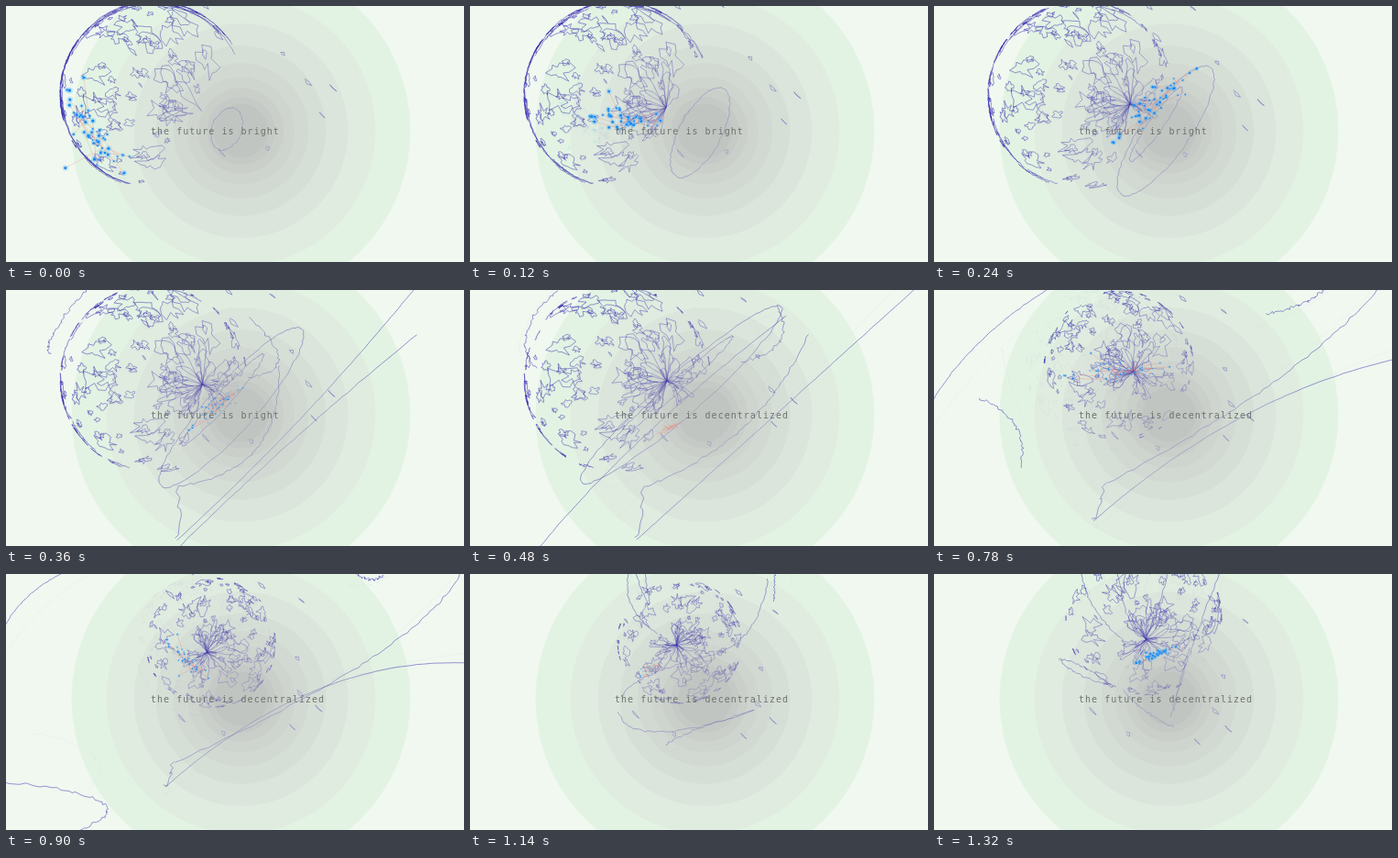
Write an HTML page with a canvas that moves like this. It is 500x279 px and loops after 1.38 s.

```html
<!DOCTYPE html>
<html lang="en">
<meta charset="utf-8">
<style>
  html, body { margin: 0; width: 100%; height: 100%; overflow: hidden; background: #f0f8f0; }
  canvas { position: absolute; left: 0; top: 0; }
  p { position: absolute; left: 158px; top: 131px; margin: 0; white-space: pre;
      font: 10px/11px "DejaVu Sans Mono", monospace; letter-spacing: 1.02px; color: #6d736d; }
</style>
<canvas id="stage" width="500" height="279"></canvas>
<p id="bright">the future is bright</p>
<p id="decentral">the future is decentralized</p>
<script>
const LOOP = 1380, STEP = 60, TAU = Math.PI * 2;
const ctx = stage.getContext('2d');

const rnd = n => { const s = Math.sin(n * 127.1 + 3.7) * 43758.5453; return s - Math.floor(s); };
const lerp = (a, b, f) => a + (b - a) * f;
const ease = x => { x = Math.max(0, Math.min(1, x)); return x * x * (3 - 2 * x); };
const range = n => [...Array(n).keys()];

// Value of a row of key poses at a time; the first and last motions run on.
function pose(times, keys, t) {
  let k = 0;
  while (k < times.length - 2 && t >= times[k + 1]) k++;
  const f = (t - times[k]) / (times[k + 1] - times[k]);
  return keys[k].map((v, i) => lerp(v, keys[k + 1][i], f));
}

function polyline(points, jag = 0, seed = 0) {
  ctx.beginPath();
  points.forEach(([x, y], i) => ctx.lineTo(
    x + jag * (rnd(i + seed) * 2 - 1), y + jag * (rnd(i + seed + 500) * 2 - 1)));
  ctx.stroke();
}

const bezier = ([ax, ay, bx, by, cx, cy], n = 60) => range(n + 1).map(i => {
  const u = i / n, v = 1 - u;
  return [v * v * ax + 2 * u * v * bx + u * u * cx, v * v * ay + 2 * u * v * by + u * u * cy];
});

function globeAt(t) {
  const shrink = ease((t - 520) / 460), rise = ease((t - 1140) / 180);
  return {
    cx: 161 + 68 * shrink, cy: 97 - 24 * shrink - 26 * rise, r: 102 - 34 * shrink + 17 * rise,
    px: 214 + 20 * (t / LOOP) ** 3, py: 115 - .033 * t
  };
}

// Land lies in polar coordinates around a tilted axis; the first pieces meet at the pole.
function drawLand({ cx, cy, r, px, py }, t) {
  const ax = (px - cx) / r, ay = (py - cy) / r, flat = Math.hypot(ax, ay) || 1e-6;
  const az = Math.sqrt(Math.max(0, 1 - flat * flat)), limit = Math.min(45 + .15 * t, 90);
  const project = (theta, phi) => {
    const s = Math.sin(theta), c = Math.cos(theta), u = s * Math.cos(phi), v = s * Math.sin(phi);
    return [cx + r * (c * ax + u * ay / flat + v * az * ax / flat),
            cy + r * (c * ay - u * ax / flat + v * az * ay / flat),
            c * az - v * flat];
  };
  for (let i = 0; i < 230; i++) {
    const ray = i < 20, size = .025 + .11 * rnd(i + 600) ** 2;
    const theta = ray ? .07 + .2 * rnd(i) : Math.acos(1 - 1.9 * rnd(i));
    const phi = TAU * rnd(i + 300) + t * .0007;
    const [x, y, z] = project(theta, phi);
    if (z < 0 || x - cx + (y - cy) * .6 > limit) continue;
    polyline(range(16).map(j => {
      const a = j % 15 / 15 * TAU, s = size * (.25 + 1.1 * rnd(i * 15 + j % 15));
      return project(Math.max(0, theta + Math.cos(a) * (ray ? theta : s * 1.5)),
                     phi + Math.sin(a) * s / Math.max(.3, Math.sin(theta)));
    }));
  }
}

// Overlapping broken arcs that thin out while the globe turns away.
function drawLimb({ cx, cy, r }, t) {
  for (let i = 0; i < 34 * (1 - t / 760); i++) {
    const start = 1.8 + 3.4 * rnd(i + 20), span = (.1 + .9 * rnd(i + 50)) * Math.max(.15, 1 - t / 500);
    const radius = r * (1 - .035 * rnd(i + 80) ** 2);
    polyline(range(25).map(j => {
      const a = start + span * j / 24;
      return [cx + radius * Math.cos(a), cy + radius * Math.sin(a)];
    }), .6, i * 30);
  }
}

// A thin continent that stretches out across the view.
function drawContinent(t) {
  const u = t / 480, cx = 241 - 10 * u + 68 * u * (1 - u), cy = 134 - 20 * u + 48 * u * (1 - u);
  const angle = -1.2 + .48 * u, long = 24 + 121 * u, wide = 16 + 6 * u + 28 * u * (1 - u);
  const c = Math.cos(angle), s = Math.sin(angle);
  for (const inner of u < .4 ? [1] : [1, .3]) {
    polyline(range(81).map(i => {
      const a = i / 80 * TAU, x = Math.cos(a) * long * (.4 + .6 * inner);
      const y = Math.sin(a) * wide * inner - wide * (1 - inner) * .7;
      return [cx + x * c - y * s, cy + x * s + y * c];
    }), .8, 40);
  }
}

// Key curves: start, control, end.
const sweepTimes = [480, 660, 900];
const edge = [[182,272, 336,134, 490,-5], [175,271, 325,140, 505,53], [174,232, 335,90, 505,97]];
const shelf = [[192,214, 320,165, 369,48], [195,215, 345,116, 476,-3], [185,205, 460,80, 497,-3]];
const streak = [[77,279, 175,160, 345,28], [-5,188, 60,85, 190,-3], [-5,66, 10,25, 65,-3]];
const cape = [[297,78, 360,65, 335,17], [345,53, 405,30, 440,-2], [382,-2, 395,12, 412,2]];
const coast = [[95,0, 40,50, 72,85], [100,8, 45,40, 108,108], [-3,226, 170,245, 80,279]];

const lateTimes = [1140, 1320];
const late = [
  [[162,150, 175,195, 310,149], [137,92, 150,112, 193,121]],
  [[310,149, 230,172, 213,187], [193,121, 165,98, 137,92]],
  [[165,135, 175,110, 265,88], [207,127, 225,150, 262,167]],
  [[265,88, 315,75, 325,5], [258,155, 280,80, 312,-3]],
  [[333,-3, 332,15, 332,30], [262,150, 268,110, 280,80]],
  [[173,-3, 165,40, 205,65], [160,-3, 170,45, 207,72]],
  [[180,-3, 205,70, 190,-3], [200,-3, 225,140, 255,-3]]];

function drawCoasts(t) {
  if (t >= 1020) {
    late.forEach((keys, i) => polyline(bezier(pose(lateTimes, keys, t), 36), 1, i * 70));
  } else if (t >= 360) {
    const near = pose(sweepTimes, edge, t), far = pose(sweepTimes, shelf, t);
    polyline(bezier(near), .2);
    polyline(bezier([...far.slice(0, 2), lerp(near[0], far[0], .3), lerp(near[1], far[1], .6), ...near.slice(0, 2)], 8), 4, 7);
    polyline(bezier(far), 1);
    polyline(bezier(pose(sweepTimes, streak, t)), .4);
    [cape, coast].forEach((keys, i) => polyline(bezier(pose(sweepTimes, keys, t), 40), 1.6, i * 90));
  }
}

function drawIslets(t) {
  for (let i = 0; i < 12; i++) {
    const a = TAU * rnd(i + 11) + t * .0006, d = 70 + 70 * rnd(i + 31);
    const x = 220 + d * Math.cos(a), y = 95 + d * .8 * Math.sin(a), l = 2 + 3 * rnd(i);
    polyline([[x - l, y - l], [x + 1, y - 1], [x + l, y + l], [x - 1, y + 1], [x - l, y - l]], 1, i * 9);
  }
}

// centre, direction, scatter, dot size
const swarmTimes = [0, 240, 480, 660, 900, 1140, 1320];
const swarm = [[97,142, 30,60, 20,2.3], [242,107, 55,-55, 12,2], [217,151, 16,-8, 4,0], [205,84, 115,-42, 16,1.3],
  [198,95, 26,28, 9,1.1], [197,105, 12,-10, 7,.6], [243,88, 27,-12, 4,1.6]];

function drawSwarm(t) {
  const [x, y, dx, dy, scatter, size] = pose(swarmTimes, swarm, t);
  const dots = range(46).map(i => {
    const along = (rnd(i) + rnd(i + 90) + rnd(i + 180)) / 1.5 - 1;
    const off = n => (rnd(i + n) + rnd(i + n + 50) - 1) * scatter * (i % 9 ? 1 : 2.5);
    return [x + dx * along + off(700), y + dy * along + off(900)];
  });
  ctx.strokeStyle = 'rgba(245,105,85,.32)';
  dots.forEach((p, i) => i % 2 && polyline([p, dots[(i + 7) % 46]]));
  dots.forEach(([px, py], i) => {
    const r = size * (.45 + .55 * rnd(i + 33));
    for (const [scale, color] of [[1.6, 'rgba(80,185,255,.3)'], [.75, '#1687f5']]) {
      ctx.fillStyle = color;
      ctx.beginPath();
      ctx.arc(px, py, r * scale, 0, TAU);
      ctx.fill();
    }
  });
}

const ink = ctx.createRadialGradient(257, 140, 10, 257, 140, 170);
ink.addColorStop(0, 'rgba(60,50,165,.28)');
ink.addColorStop(1, 'rgba(45,35,170,.68)');

function drawWorld(t) {
  const globe = globeAt(t);
  ctx.strokeStyle = ink;
  ctx.lineWidth = .7;
  drawLand(globe, t);
  drawLimb(globe, t);
  if (t < 600) drawContinent(t);
  drawCoasts(t);
  drawIslets(t);
  drawSwarm(t);
}

function drawRings() {
  ctx.fillStyle = '#f0f8f0';
  ctx.fillRect(0, 0, 500, 279);
  for (let i = 0; i < 9; i++) {
    const grey = 227 - 4.2 * i, green = grey + 16 * Math.exp(-.2 * i);
    ctx.fillStyle = `rgb(${grey},${green},${grey})`;
    ctx.beginPath();
    ctx.arc(256.5, 136, 185 * Math.exp(-.23 * i), 0, TAU);
    ctx.fill();
  }
}

const saysBright = t => t < 420 || t >= 600 && t < 720;

function frame(now) {
  const t = Math.floor(now % LOOP / STEP) * STEP;
  drawRings();
  if (t) {
    ctx.globalAlpha = .06;
    drawWorld(t - STEP);
    ctx.globalAlpha = 1;
  }
  drawWorld(t);
  const isBright = saysBright(t), fading = t && saysBright(t - 2 * STEP) !== isBright ? .1 : 0;
  bright.style.opacity = isBright ? 1 : fading;
  decentral.style.opacity = isBright ? fading : 1;
  requestAnimationFrame(frame);
}
requestAnimationFrame(frame);
</script>
</html>
```
